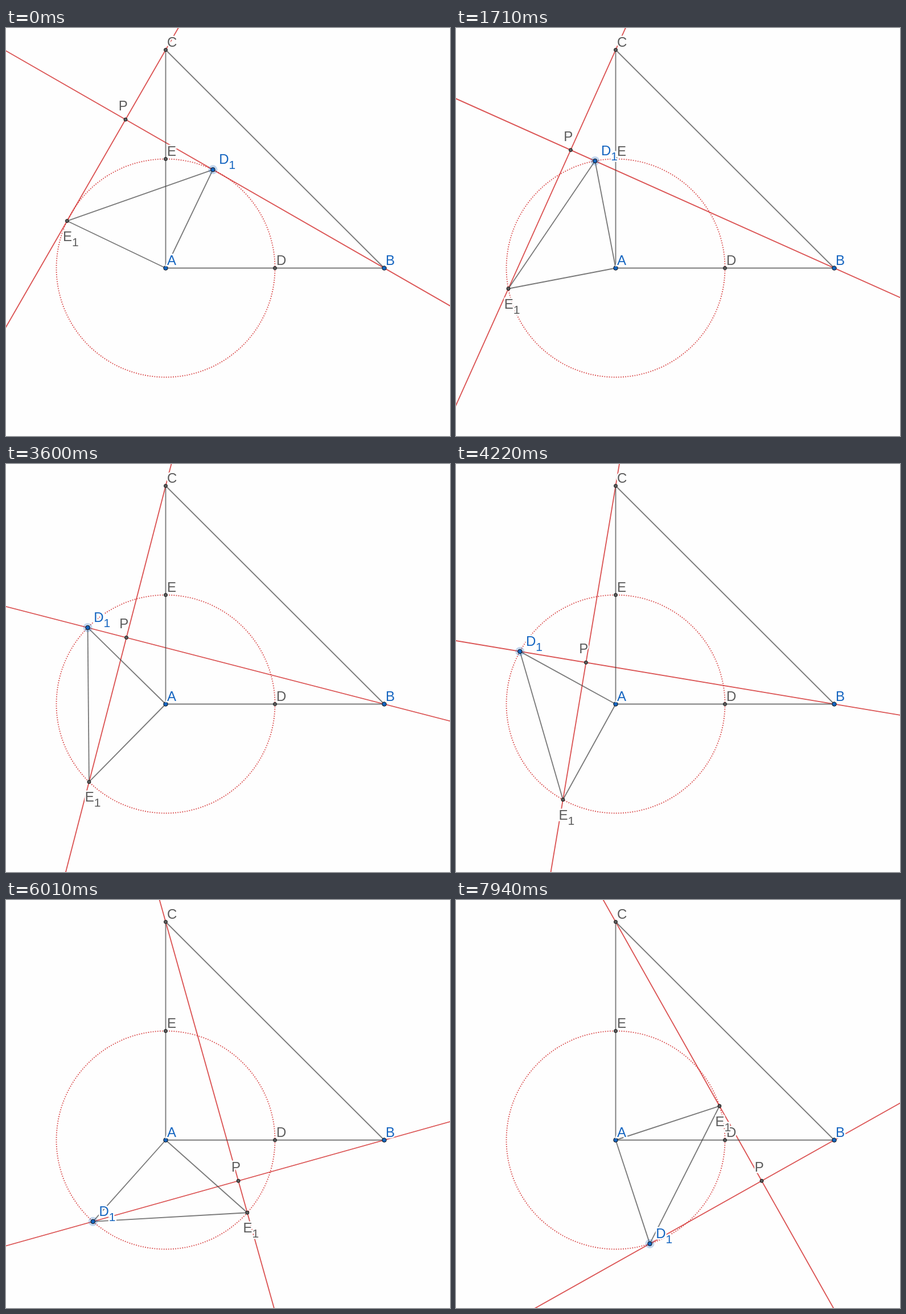
Animation, 780 px wide and 718 px high, one loop 8 s. Source, as an HTML page with a canvas:

```html
<!DOCTYPE html>
<html lang="en">
<head>
<meta charset="utf-8">
<style>
  html, body { margin: 0; width: 100%; height: 100%; overflow: hidden; background: #fefefe; }
  canvas { display: block; }
</style>
</head>
<body>
<canvas id="stage" width="780" height="718"></canvas>
<script>
const ctx = document.getElementById('stage').getContext('2d');
const LOOP = 8000, STEP = 120, RADIUS = 192, LINE = 1.85;
const PAPER = '#fefefe', RED = 'rgba(211,47,47,.82)', GREY = 'rgba(68,68,68,.7)';
const BLUE = '#1565c0', DARK = '#5c5c5c';

const A = [280.5, 422.5];
const offset = (dx, dy) => [A[0] + dx, A[1] + dy];
const B = offset(2 * RADIUS, 0), C = offset(0, -2 * RADIUS);
const D = offset(RADIUS, 0), E = offset(0, -RADIUS);

// Hand-dragged motion: [step, angle in degrees].
const drag = [[0, 64.4], [2, 73.5], [7, 86.9], [19, 114.3], [29, 135.5],
  [39, 171.3], [49, 228.3], [61, 265.1], [65, 288.2]];

const slope = (p, q) => (q[1] - p[1]) / (q[0] - p[0]);
const tangent = i => slope(drag[Math.max(i - 1, 0)], drag[Math.min(i + 1, drag.length - 1)]);

// Smooth cubic curve through the drag points.
function angleAt(step) {
  const i = Math.min(drag.findLastIndex(k => k[0] <= step), drag.length - 2);
  const [s0, a0] = drag[i], [s1, a1] = drag[i + 1];
  const h = s1 - s0, u = (step - s0) / h, v = 1 - u;
  return a0 * v * v * (1 + 2 * u) + a1 * u * u * (1 + 2 * v)
    + h * u * v * (tangent(i) * v - tangent(i + 1) * u);
}

function onCircle(degrees) {
  const a = degrees * Math.PI / 180;
  return offset(RADIUS * Math.cos(a), -RADIUS * Math.sin(a));
}

// Foot of the perpendicular from p to the line through q and r.
function foot(p, q, r) {
  const dx = r[0] - q[0], dy = r[1] - q[1];
  const k = ((p[0] - q[0]) * dx + (p[1] - q[1]) * dy) / (dx * dx + dy * dy);
  return [q[0] + k * dx, q[1] + k * dy];
}

function segment(p, q, color = GREY) {
  ctx.strokeStyle = color;
  ctx.lineWidth = LINE;
  ctx.beginPath();
  ctx.moveTo(...p);
  ctx.lineTo(...q);
  ctx.stroke();
}

function line(p, q) {
  const dx = q[0] - p[0], dy = q[1] - p[1], k = 1500 / Math.hypot(dx, dy);
  segment([p[0] - dx * k, p[1] - dy * k], [p[0] + dx * k, p[1] + dy * k], RED);
}

function dottedCircle() {
  ctx.strokeStyle = RED;
  ctx.lineWidth = LINE;
  ctx.setLineDash([LINE, 2.25]);
  ctx.beginPath();
  ctx.arc(...A, RADIUS, 0, 2 * Math.PI);
  ctx.stroke();
  ctx.setLineDash([]);
}

function disc([x, y], r, fill) {
  ctx.fillStyle = fill;
  ctx.beginPath();
  ctx.arc(x, y, r, 0, 2 * Math.PI);
  ctx.fill();
}

function label([letter, index], x, y, color) {
  const write = (text, size, tx, ty) => {
    ctx.font = `${size}px "Liberation Sans", Arial, sans-serif`;
    ctx.strokeText(text, tx, ty);
    ctx.fillText(text, tx, ty);
    return tx + ctx.measureText(text).width;
  };
  ctx.fillStyle = color;
  ctx.strokeStyle = PAPER;
  ctx.lineWidth = 5;
  const end = write(letter, 24, x, y);
  if (index) write(index, 21, end, y + 9);
}

function point(p, name, color = DARK, dx = 2.5, dy = -6) {
  disc(p, color === BLUE ? 3.75 : 3, color);
  ctx.strokeStyle = '#111';
  ctx.lineWidth = 1;
  ctx.stroke();
  label(name, p[0] + dx, p[1] + dy, color);
}

function draw(time) {
  const angle = angleAt(Math.max(0, Math.floor(time / STEP) - 1));
  const D1 = onCircle(angle), E1 = onCircle(angle + 90), P = foot(C, B, D1);

  ctx.fillStyle = PAPER;
  ctx.fillRect(0, 0, 780, 718);

  dottedCircle();
  line(B, D1);
  line(C, E1);
  for (const [p, q] of [[A, B], [B, C], [C, A], [A, D1], [D1, E1], [E1, A]]) segment(p, q);

  point(A, 'A', BLUE);
  point(B, 'B', BLUE);
  point(C, 'C');
  point(D, 'D');
  point(E, 'E');
  disc(D1, 8, 'rgba(21,101,192,.25)');
  point(D1, 'D1', BLUE, 10.7, -10);
  point(E1, 'E1', DARK, -7.3, 35);
  point(P, 'P', DARK, -12.2, -16);
}

const begin = performance.now();
function frame() {
  draw((performance.now() - begin) % LOOP);
  requestAnimationFrame(frame);
}
frame();
</script>
</body>
</html>
```
